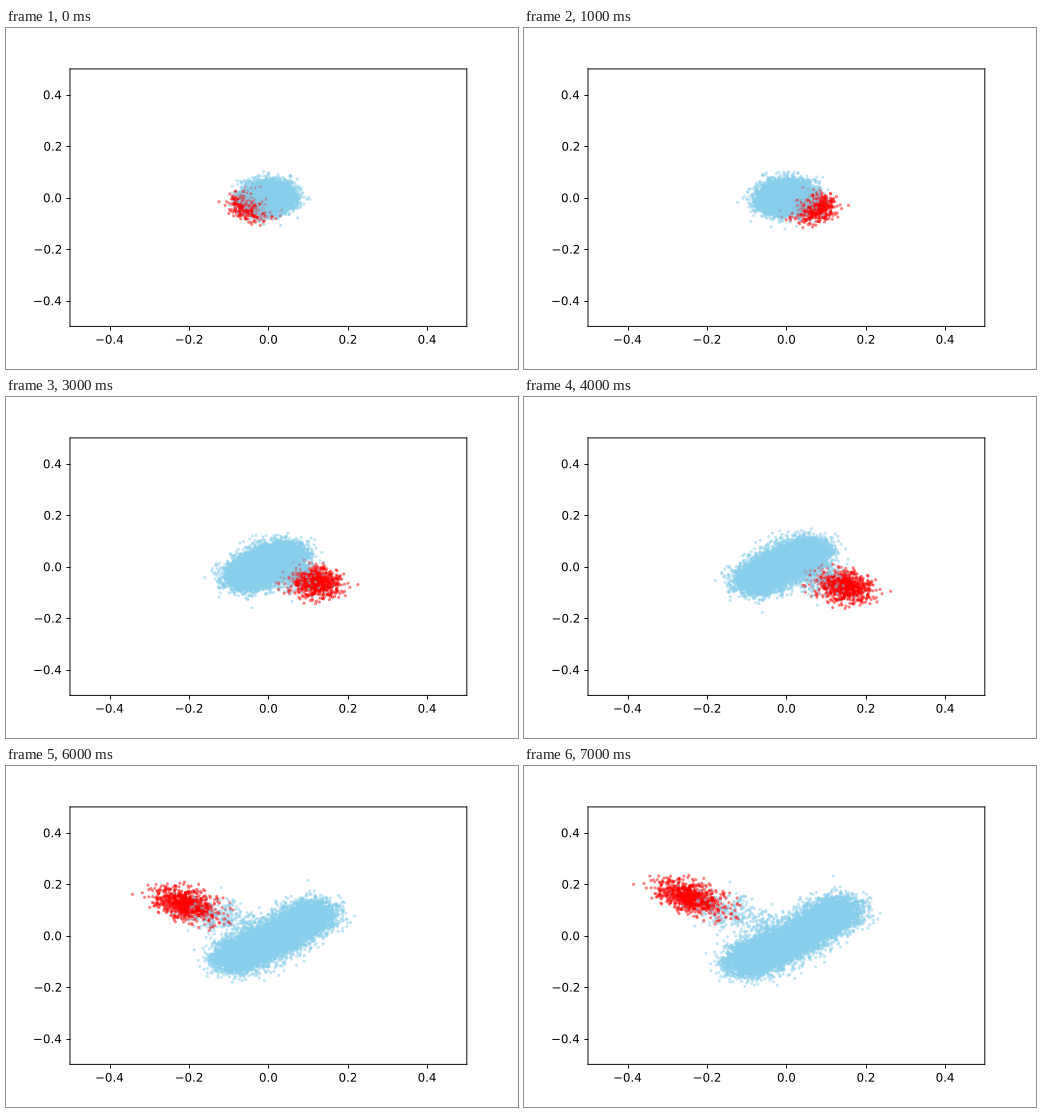
A matplotlib script that plays this animation: 512x341 px, repeating every 8 s.

```python
import numpy as np
import matplotlib.pyplot as plt
from matplotlib.animation import FuncAnimation
from matplotlib.patches import PathPatch
from matplotlib.textpath import TextPath
from matplotlib.transforms import Affine2D

W, H = 512, 341
DPI = W / 6
PT = DPI / 72
N_RED, N_BRIDGE, N_BODY = 800, 380, 8820
STEPS = 8

plt.rcParams["path.snap"] = False

rng = np.random.default_rng(7)
red_noise = rng.normal(size=(N_RED, 2))
body_noise = rng.normal(size=(N_BODY, 2))
bridge_noise = rng.normal(size=(N_BRIDGE, 2))
along = np.tanh(rng.normal(size=N_BODY))
reach = rng.beta(1.1, 1.6, size=(N_BRIDGE, 1))

# One shuffled drawing order, so red and blue dots cover each other.
order = rng.permutation(N_RED + N_BRIDGE + N_BODY)
colors = np.where(order < N_RED, "red", "skyblue")


def red_center(t):
    return np.array([-0.04 - 0.0225 * t - 0.0009 * t**2,
                     0.03 + 0.0055 * t + 0.0017 * t**2])


def red_cloud(t):
    a, b = red_noise.T
    rho = -0.08 * t
    x = (0.026 + 0.0026 * t) * a
    y = (0.026 + 0.0012 * t) * (rho * a + np.sqrt(1 - rho**2) * b)
    return red_center(t) + np.column_stack([x, y])


def body_cloud(t):
    bend = 0.0025 * t * (along**2 - np.mean(along**2))
    axis = np.column_stack([0.018 * t * along, 0.0155 * t * along + bend])
    return axis + (0.027 + 0.0008 * t) * body_noise - 0.07 * red_center(t)


def bridge_cloud(t):
    return reach * red_center(t) + (0.027 + 0.001 * t) * bridge_noise


def flips(t):
    """Axis signs, which jump between steps."""
    if t == 0:
        return np.array([1, -1])
    return np.array([-1, -1]) if t < 5 else np.array([1, 1])


def positions(t):
    pts = np.vstack([red_cloud(t), bridge_cloud(t), body_cloud(t)])
    return (pts * flips(t))[order]


def label(text, x, base, align):
    """Draw text as an outline at an exact pixel place, without hinting."""
    path = TextPath((0, 0), text, size=10 * PT)
    box = path.get_extents()
    anchor = box.x1 if align == "right" else (box.x0 + box.x1) / 2
    move = Affine2D().translate(x - anchor, base)
    fig.add_artist(PathPatch(path, fc="black", lw=0, transform=move))


fig = plt.figure(figsize=(6, H / DPI + 1e-6), dpi=DPI)
fig.subplots_adjust(left=0.125, right=0.9, bottom=0.125, top=0.88)
ax = fig.add_subplot()
ax.set(xlim=(-0.5, 0.5), ylim=(-0.5, 0.5))
ticks = [-0.4, -0.2, 0, 0.2, 0.4]
ax.set_xticks(ticks, labels=[])
ax.set_yticks(ticks, labels=[])

left, bottom = ax.transAxes.transform((0, 0))
for v in ticks:
    px, py = ax.transData.transform((v, v))
    text = f"{v:.1f}".replace("-", "\u2212")
    label(text, px, bottom - 14.6 * PT, "center")
    label(text, left - 7.5 * PT, py - 3.8 * PT, "right")

dots = ax.scatter(*positions(0).T, s=7, c=colors, alpha=0.5, linewidths=0)


def update(t):
    dots.set_offsets(positions(t))
    return (dots,)


anim = FuncAnimation(fig, update, frames=STEPS, interval=1000, repeat=True)
plt.show()
```
